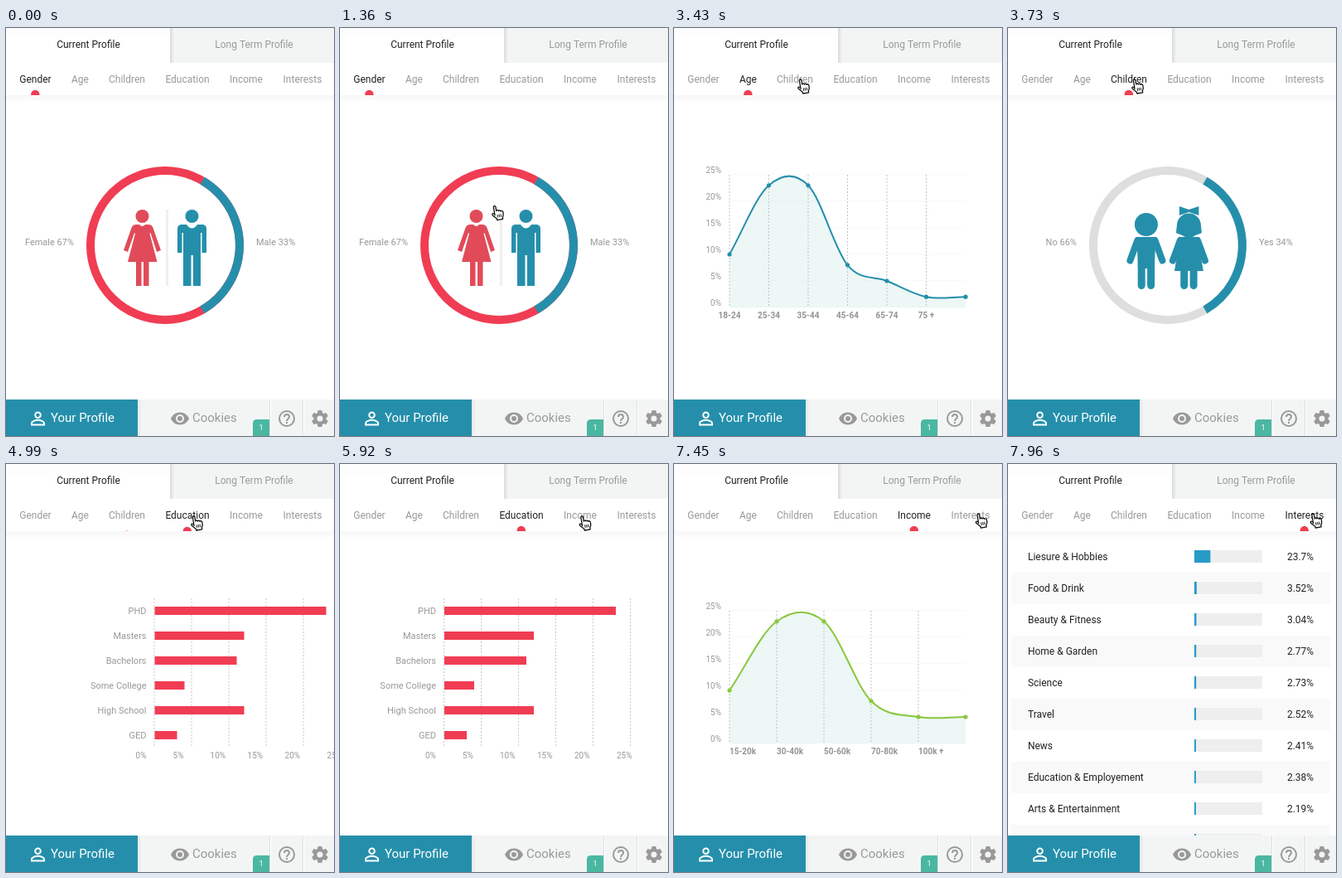
Recreate the animation shown at these times as an HTML page with a canvas. Size 396 px wide and 492 px high, loop 7990 ms.

```html
<!DOCTYPE html>
<html lang="en">
<head>
<meta charset="utf-8">
<title>Profile tabs</title>
<style>
html, body { margin: 0; width: 100%; height: 100%; overflow: hidden; background: #fff; }
canvas { display: block; width: 396px; height: 492px; }
</style>
</head>
<body>
<canvas id="stage" width="396" height="492"></canvas>
<script>
const ctx = document.getElementById('stage').getContext('2d');
const LOOP = 7990, PITCH = 400, SLIDE = 300;
const BLUE = '#258fab', RED = '#f03d53', GREEN = '#8ac73e', GREY = '#999', DARK = '#222';

const tabs = [['Gender', 35.5], ['Age', 89.5], ['Children', 146], ['Education', 219], ['Income', 290], ['Interests', 358]];
const clicks = [2092, 3450, 4819, 6073, 7700];

// Pointer moves: start, end, target x, target y
const moves = [
  [1000, 1780, 92, 64], [2450, 2830, 151, 63], [2980, 3130, 152.5, 62],
  [3850, 4360, 226.5, 63], [5530, 5920, 292, 63], [6700, 7500, 368, 60]
];

const clamp = v => Math.min(1, Math.max(0, v));
const smooth = v => { v = clamp(v); return v * v * (3 - 2 * v); };

// cubic-bezier(.25, .1, .25, 1)
function ease(v) {
  if (v <= 0 || v >= 1) return clamp(v);
  let lo = 0, hi = 1, s = 0.5;
  for (let i = 0; i < 20; i++) {
    s = (lo + hi) / 2;
    const x = 0.75 * s * (1 - s) + s * s * s;
    if (x < v) lo = s; else hi = s;
  }
  const r = 1 - s;
  return 0.3 * r * r * s + 3 * r * s * s + s * s * s;
}

function rect(x, y, w, h, color) {
  ctx.fillStyle = color;
  ctx.fillRect(x, y, w, h);
}

function disc(x, y, r, color) {
  ctx.fillStyle = color;
  ctx.beginPath();
  ctx.arc(x, y, r, 0, Math.PI * 2);
  ctx.fill();
}

function shape(d, color) {
  ctx.fillStyle = color;
  ctx.fill(new Path2D(d), 'evenodd');
}

function line(x1, y1, x2, y2, color, width = 1, dash = []) {
  ctx.strokeStyle = color;
  ctx.lineWidth = width;
  ctx.setLineDash(dash);
  ctx.beginPath();
  ctx.moveTo(x1, y1);
  ctx.lineTo(x2, y2);
  ctx.stroke();
  ctx.setLineDash([]);
}

function fade(x, y, w, h, from, to, vertical) {
  const g = ctx.createLinearGradient(x, y, vertical ? x : x + w, vertical ? y + h : y);
  g.addColorStop(0, from);
  g.addColorStop(1, to);
  rect(x, y, w, h, g);
}

// y is the middle of the capitals
function text(str, x, y, size, color = GREY, align = 'left', weight = 400) {
  ctx.font = `${weight} ${size}px Roboto, sans-serif`;
  ctx.textAlign = align;
  ctx.fillStyle = color;
  ctx.fillText(str, x, y + size * 0.355);
}

function ring(base, left, right) {
  const arc = (a, b, color) => {
    ctx.strokeStyle = color;
    ctx.lineWidth = 10;
    ctx.beginPath();
    ctx.arc(192, 262, 90, a, b);
    ctx.stroke();
  };
  arc(0, Math.PI * 2, base);
  arc(-Math.PI / 3, Math.PI / 3, BLUE);
  text(left, 82, 258, 11, GREY, 'right');
  text(right, 302, 258, 11);
}

function gender() {
  ring(RED, 'Female 67%', 'Male 33%');
  const pink = '#e14b59';
  disc(164.5, 227, 8, pink);
  shape('M157 237H161Q164.5 241 168 237H172Q176 237 177.5 241L187 268 182 270 174.5 247 173.5 248 182.5 282H172.5V311H166V282H163.5V311H157V282H147L156 248 155 247 147 270 142 268 151.5 241Q153 237 157 237Z', pink);
  rect(193, 219, 3, 92, '#efefef');
  disc(224.5, 227, 8, BLUE);
  shape('M211 237H218Q224.5 246 231 237H238Q242 238 242 242V271H236.5V247H235V311H226V274H223.5V311H214V247H212.5V271H207V242Q207 238 211 237Z', BLUE);
}

function limbs(cx) {
  ctx.lineCap = 'round';
  for (const s of [-1, 1]) {
    line(cx + s * 10.5, 256, cx + s * 19.5, 280.5, BLUE, 8);
    line(cx + s * 5.7, 285, cx + s * 5.7, 310.5, BLUE, 9);
  }
  ctx.lineCap = 'butt';
}

function children() {
  ring('#dedede', 'No 66%', 'Yes 34%');
  disc(166, 237, 14, BLUE);
  shape('M156 252H176L177 262 176 290H156L155 262Z', BLUE);
  limbs(166);
  disc(217.5, 238, 14.5, BLUE);
  shape('M206 215 217.5 219 229.5 215V226L217.5 222 206 226Z', BLUE);
  shape('M203 238L202 247Q208 250 217.5 251 227 250 233 247L232 238Z', BLUE);
  shape('M207.5 252H227.5L235 293H200Z', BLUE);
  limbs(217.5);
}

function curveChart(values, step, labels, color, align) {
  const X = i => 67 + i * step, Y = v => 337 - 6.4 * v;
  const n = values.length - 1;
  const slope = i => i === 0 ? Y(values[1]) - Y(values[0]) : i === n ? 0 : (Y(values[i + 1]) - Y(values[i - 1])) / 2;
  const curve = new Path2D();
  curve.moveTo(X(0), Y(values[0]));
  for (let i = 0; i < n; i++) {
    curve.bezierCurveTo(X(i + 1 / 3), Y(values[i]) + slope(i) / 3,
      X(i + 2 / 3), Y(values[i + 1]) - slope(i + 1) / 3, X(i + 1), Y(values[i + 1]));
  }
  const area = new Path2D(curve);
  area.lineTo(X(n), Y(0));
  area.lineTo(X(0), Y(0));
  for (let v = 0; v <= 25; v += 5) {
    line(67, Y(v) - 0.5, X(n), Y(v) - 0.5, '#f8f9f9');
    text(v + '%', 57, Y(v) - 5.5, 10, GREY, 'right');
  }
  ctx.fillStyle = 'rgba(205,234,231,.38)';
  ctx.fill(area);
  labels.forEach((label, i) => {
    line(X(i), 177, X(i), 337, '#bfc4c4', 1, [2, 2]);
    text(label, X(i), 346.5, 10, '#949494', align, 700);
  });
  ctx.strokeStyle = color;
  ctx.lineWidth = 2;
  ctx.stroke(curve);
  values.forEach((v, i) => disc(X(i), Y(v), 2.6, color));
}

function age() {
  curveChart([10, 23, 23, 8, 5, 2, 2], 47.5, ['18-24', '25-34', '35-44', '45-64', '65-74', '75 +'], BLUE, 'center');
}

function income() {
  curveChart([10, 23, 23, 8, 5, 5], 57, ['15-20k', '30-40k', '50-60k', '70-80k', '100k +'], GREEN, 'left');
}

function education() {
  const bars = [['PHD', 23], ['Masters', 12], ['Bachelors', 11], ['Some College', 4], ['High School', 12], ['GED', 3]];
  for (let i = 0; i < 6; i++) {
    const x = 126 + i * 45;
    line(x - 0.5, 162, x - 0.5, 341, '#c8c8c8', 1, [2, 2]);
    text(i * 5 + '%', x - 23 + (i === 5 ? 6 : 0), 351.5, 10);
  }
  bars.forEach(([name, v], i) => {
    const y = 177 + i * 30;
    text(name, 116, y, 11, GREY, 'right');
    rect(126, y - 5, v * 9, 10, RED);
  });
}

function interests() {
  const rows = [['Liesure & Hobbies', 23.7], ['Food & Drink', 3.52], ['Beauty & Fitness', 3.04], ['Home & Garden', 2.77],
    ['Science', 2.73], ['Travel', 2.52], ['News', 2.41], ['Education & Employement', 2.38], ['Arts & Entertainment', 2.19], ['', 2.1]];
  rows.forEach(([name, v], i) => {
    const y = 112 + i * 38;
    if (i % 2) rect(0, y - 19, 385, 38, '#f9f9f9');
    text(name, 20, y, 12, DARK);
    rect(221, y - 8, 82, 15, '#eee');
    rect(221, y - 8, Math.max(2, v * 0.82), 15, '#279bc8');
    if (name) text(v + '%', 333, y, 12, DARK);
  });
}

const slides = [gender, age, children, education, income, interests];

function header(steps, active) {
  rect(0, 0, 396, 81, '#fff');
  rect(0, 0, 199, 12, '#fdfdfd');
  fade(0, 81, 396, 7, '#f7f7f7', '#fcfcfc', true);
  rect(199, 0, 197, 42, '#f3f5f5');
  fade(198, 0, 5, 42, '#d9dbdb', '#f3f5f5');
  text('Current Profile', 99.5, 20, 12, DARK, 'center');
  text('Long Term Profile', 299.5, 20, 12, GREY, 'center');
  ctx.save();
  ctx.beginPath();
  ctx.rect(0, 42, 396, 39);
  ctx.clip();
  tabs.forEach(([name, x], i) => {
    const shown = (i ? steps[i - 1] : 1) - (i < 5 ? steps[i] : 0);
    if (shown > 0) disc(x - 0.2, 80 + 6.5 * (1 - shown), 5.2, RED);
    text(name, x, 62, 12, i === active ? DARK : GREY, 'center');
  });
  ctx.restore();
}

function person(x, y) {
  ctx.strokeStyle = '#fff';
  ctx.lineWidth = 2;
  ctx.beginPath();
  ctx.arc(x, y - 4.2, 3.3, 0, Math.PI * 2);
  ctx.stroke();
  ctx.stroke(new Path2D(`M${x - 7.5} ${y + 7.5}v-2.2c0-2 4.5-3.5 7.5-3.5s7.5 1.5 7.5 3.5v2.2z`));
}

function eye(x, y) {
  shape(`M${x - 11} ${y}c1.7-4.4 6-7.5 11-7.5s9.3 3.1 11 7.5c-1.7 4.4-6 7.5-11 7.5s-9.3-3.1-11-7.5z`, GREY);
  disc(x, y, 5, '#f3f5f5');
  disc(x, y, 3, GREY);
}

function help(x, y) {
  ctx.strokeStyle = GREY;
  ctx.lineWidth = 2;
  ctx.beginPath();
  ctx.arc(x, y, 9, 0, Math.PI * 2);
  ctx.stroke();
  ctx.stroke(new Path2D(`M${x - 3} ${y - 2}a3 3 0 1 1 6 0c0 2.2-3 2.3-3 5`));
  rect(x - 1, y + 4, 2, 2, GREY);
}

function gear(x, y) {
  disc(x, y, 7.5, GREY);
  for (let i = 0; i < 6; i++) {
    ctx.save();
    ctx.translate(x, y);
    ctx.rotate(i * Math.PI / 3);
    shape('M-2.3-10H2.3L3.6-5H-3.6Z', GREY);
    ctx.restore();
  }
  disc(x, y, 3.5, '#f3f5f5');
}

function footer() {
  rect(0, 448, 396, 44, '#f3f5f5');
  rect(0, 448, 159, 44, BLUE);
  fade(159, 448, 5, 44, '#e4e8e8', '#f3f5f5');
  person(38.5, 471);
  text('Your Profile', 54, 470, 15, '#fff');
  eye(210, 471);
  text('Cookies', 225, 470, 15);
  for (const x of [318, 358]) {
    rect(x, 448, 1, 44, '#dcdfdf');
    rect(x + 1, 448, 1, 44, '#fff');
  }
  shape('M298 492V477Q298 472 303 472H318V492Z', '#4ab7a1');
  text('1', 308, 482, 9, '#fff', 'center');
  help(339, 471);
  gear(379, 471);
}

function pointer(t) {
  if (t < 1000) return;
  let x = 262, y = 335;
  for (const [a, b, tx, ty] of moves) {
    const k = smooth((t - a) / (b - a));
    x += (tx - x) * k;
    y += (ty - y) * k;
  }
  ctx.save();
  ctx.translate(x, y);
  ctx.rotate(-0.16);
  ctx.translate(-5.5, -0.7);
  const hand = new Path2D('M4.2 12V2Q4.2.7 5.5.7T6.8 2V7Q6.8 6.2 8 6.2 9.4 6.2 9.4 7.4 9.6 6.8 10.7 6.8 12 7 12 8.2 12.3 7.6 13.3 7.8 14.6 8.2 14.6 9.5L14.4 13 13 16V18H6V16.5L1.5 11.5Q.7 10 1.8 9.4 2.8 9 4.2 11Z');
  ctx.fillStyle = '#fff';
  ctx.fill(hand);
  ctx.strokeStyle = '#111';
  ctx.lineWidth = 1.3;
  ctx.lineJoin = 'round';
  ctx.stroke(hand);
  for (const kx of [7.4, 9.4, 11.4]) line(kx, 11.5, kx, 15, '#111', 0.9);
  ctx.restore();
}

function draw(t) {
  const steps = clicks.map(c => ease((t - c) / SLIDE));
  const pos = steps.reduce((a, b) => a + b, 0);
  rect(0, 0, 396, 492, '#fff');
  slides.forEach((slide, i) => {
    if (Math.abs(i - pos) >= 1.1) return;
    ctx.save();
    ctx.translate((i - pos) * PITCH, 0);
    slide();
    ctx.restore();
  });
  header(steps, clicks.filter(c => t >= c).length);
  footer();
  pointer(t);
}

const begin = performance.now();
function tick() {
  draw((performance.now() - begin) % LOOP);
  requestAnimationFrame(tick);
}
tick();
</script>
</body>
</html>
```
